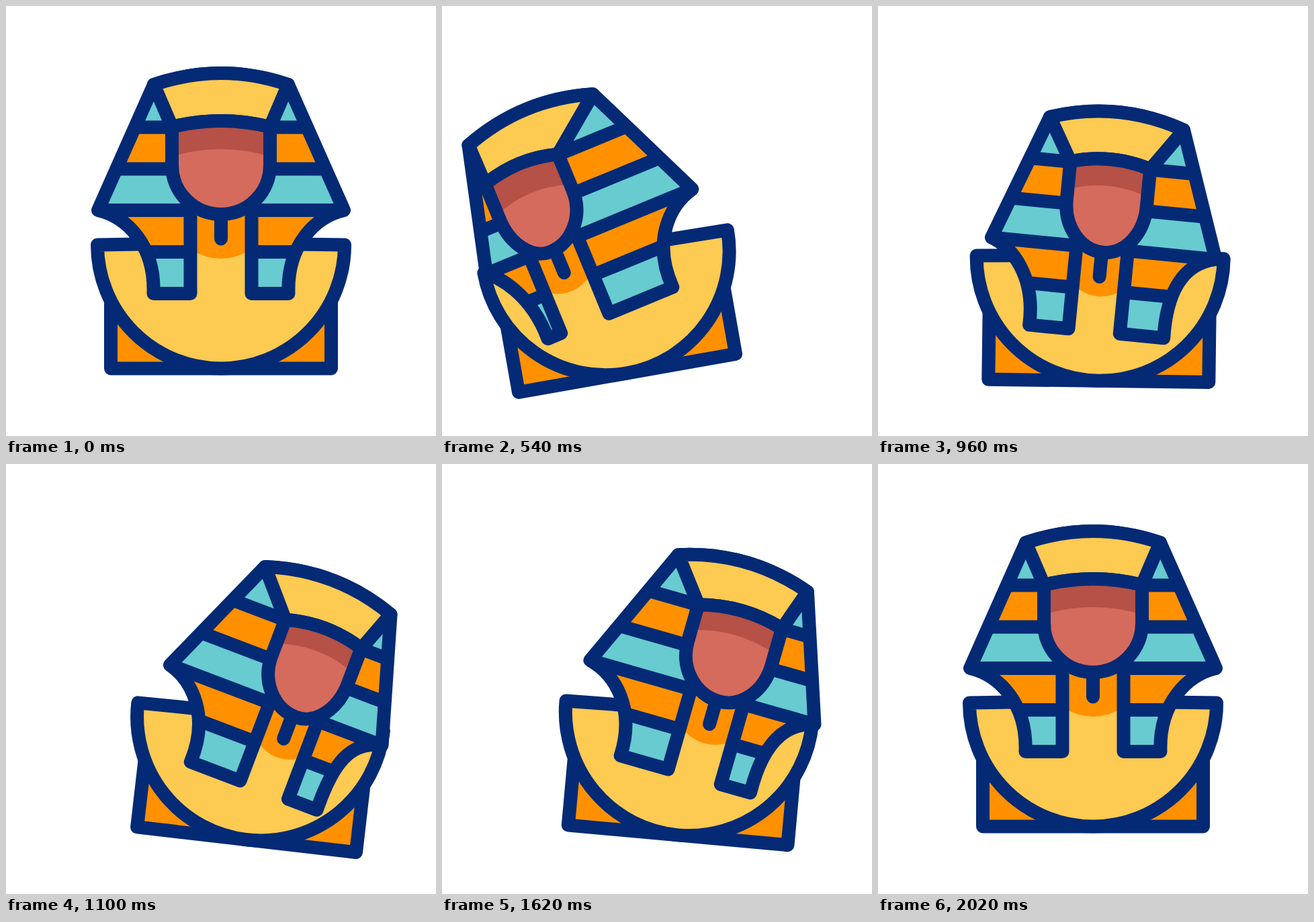
Animation, 640 px wide and 640 px high, one loop 2400 ms. Source, as an HTML page:

```html
<!DOCTYPE html>
<html lang="en">
<head>
<meta charset="utf-8">
<title>Swaying pharaoh</title>
<style>
  html, body { margin: 0; width: 100%; height: 100%; overflow: hidden; background: #fff; }
  svg { display: block; width: 100%; height: 100%; }
  .line { stroke: #042a75; stroke-width: 20; stroke-linecap: round; stroke-linejoin: round; }
  .none { fill: none; }
  .gold { fill: #fdca52; }
  .orange { fill: #ff9100; }
  .teal { fill: #67cbd0; }
  .skin { fill: #d56b5c; }
  .shade { fill: #b55146; }
</style>
</head>
<body>
<svg viewBox="0 0 640 640">
  <clipPath id="clip"><path id="clipShape"/></clipPath>

  <g id="body">
    <rect class="line orange" x="156" y="430" width="328" height="109.5"/>
    <path class="line gold" d="M136 355.5Q320 352 504 355.5A184 184 0 0 1 136 355.5Z"/>
  </g>

  <g id="head">
    <path id="neck" class="orange"/>
    <g clip-path="url(#clip)">
      <rect class="teal" x="100" y="80" width="440" height="360"/>
      <path class="orange" d="M100 180H540V242H100ZM100 304H540V366H100Z"/>
      <path class="line none" d="M100 180.5H540M100 242.5H540M100 304H540M100 366H540"/>
    </g>
    <path id="outline" class="line none"/>
    <path id="beard" class="line none"/>
    <path id="forehead" class="line gold"/>
    <path id="face" class="shade"/>
    <path id="cheeks" class="skin"/>
    <path id="faceLine" class="line none"/>
  </g>
</svg>

<script>
const LOOP = 2400;
const $ = id => document.getElementById(id);
const draw = (id, d) => $(id).setAttribute('d', d);

// Cubic easing curve through (x1, 0) and (x2, 1), solved by bisection.
function ease(t, from, to, x1, x2) {
  const p = Math.min(1, Math.max(0, (t - from) / (to - from)));
  if (p === 0 || p === 1) return p;
  let lo = 0, hi = 1;
  for (let i = 0; i < 30; i++) {
    const s = (lo + hi) / 2, u = 1 - s;
    if (3 * x1 * s * u * u + 3 * x2 * s * s * u + s * s * s < p) lo = s; else hi = s;
  }
  return lo * lo * (3 - 2 * lo);
}

// Weights of the left and the right pose; the swing across has its own softness.
function weights(t, soft) {
  const out = ease(t, 0, 595, .65, .44);
  const across = ease(t, 607, 1266, soft, 1 - soft);
  const back = ease(t, 1328, 1994, .65, .35);
  return { l: out - across, r: across - back };
}

function place(id, px, py, x, y, angle) {
  $(id).setAttribute('transform',
    `translate(${px + x} ${py + y}) rotate(${angle}) translate(${-px} ${-py})`);
}

function shapeHead({ l, r }) {
  const mid = 320 - 41 * l + 21 * r;
  const faceScale = 1 - .2 * l - .17 * r;
  const drapeScale = 1 - .155 * l - .16 * r;
  const a = mid - 73 * faceScale, b = mid + 73 * faceScale;
  const dl = mid - 45.5 * drapeScale, dr = mid + 45.5 * drapeScale;
  const chin = mid - 7 * l + 7 * r;

  const outline = `M220 117Q320 83 420 117L${503 - 28 * r} 304` +
    `C${460 - 32 * r} 314 418 356 420.5 428H${dr}V300H${dl}V428H219.5` +
    `C222 356 ${180 + 6 * l} 314 ${137 + 35 * l} 304Z`;
  draw('clipShape', outline);
  draw('outline', outline);

  const brow = `M${a} 180Q${mid} 162 ${b} 180`;
  const jaw = `V237A${b - chin} 73 0 0 1 ${chin} 310A${chin - a} 73 0 0 1 ${a} 237Z`;
  const tan = 224 + 5 * l - 7 * r;
  draw('face', brow + jaw);
  draw('faceLine', brow + jaw);
  draw('cheeks', `M${a} ${tan}Q${mid} ${tan - 22} ${b} ${tan}${jaw}`);
  draw('forehead', `${brow}L420 117Q320 83 220 117Z`);
  draw('neck', `M${dl} 290V362Q${mid} 390 ${dr} 362V290Z`);
  draw('beard', `M${mid} 310V346.5`);
}

const start = performance.now();

function frame() {
  const t = (performance.now() - start) % LOOP;
  const turn = weights(t, .65), slide = weights(t, .53);
  const dip = slide.l * slide.r;
  place('body', 320, 540,
    -44.8 * slide.l + 47 * slide.r,
    7 * slide.l + 19.4 * slide.r + 17 * dip,
    -10.1 * turn.l + 7.85 * turn.r);
  place('head', 320, 317,
    -113 * slide.l + 110 * slide.r,
    37.6 * slide.l + 57.5 * slide.r + 32 * dip,
    -22.6 * turn.l + 24.1 * turn.r);
  shapeHead(turn);
  requestAnimationFrame(frame);
}
frame();
</script>
</body>
</html>
```
